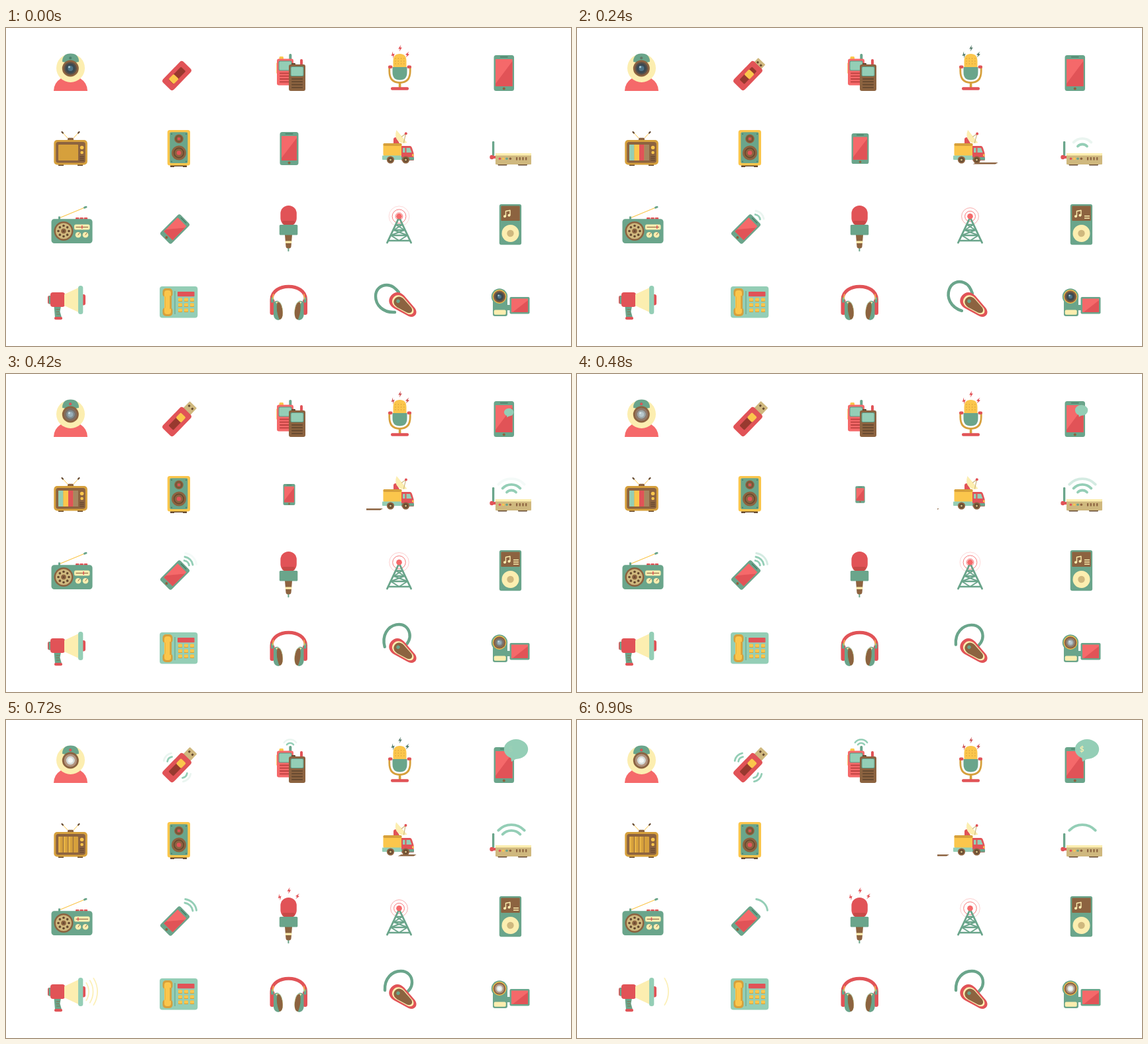
An HTML page that plays this animation: 853x480 px, repeating every 0.96 s.

```html
<!DOCTYPE html>
<html lang="en">
<head>
<meta charset="utf-8">
<title>Media icons</title>
<style>
html, body { margin: 0; width: 100%; height: 100%; overflow: hidden; background: #fff; }
svg { display: block; width: 853px; height: 480px; }
</style>
</head>
<body>
<svg id="stage" viewBox="0 0 853 480" xmlns="http://www.w3.org/2000/svg"></svg>
<script>
const RED = '#e15357', PINK = '#f5696a', GREEN = '#6aa58b', MINT = '#94ceb6',
  YELLOW = '#fbc64c', OCHRE = '#d6a03c', CREAM = '#fceeb0', TAN = '#cfb87e',
  BROWN = '#8c6340', DARK = '#64482f', MAROON = '#98392f';
const LOOP = 960, STEP = 60;

const rect = (x, y, w, h, fill, r = 0, more = '') =>
  `<rect x="${x}" y="${y}" width="${w}" height="${h}" rx="${r}" fill="${fill}" ${more}/>`;
const circ = (x, y, r, fill, more = '') =>
  `<circle cx="${x}" cy="${y}" r="${r}" fill="${fill}" ${more}/>`;
const path = (d, fill, more = '') => `<path d="${d}" fill="${fill}" ${more}/>`;
const line = (d, color, w, more = '') =>
  `<path d="${d}" fill="none" stroke="${color}" stroke-width="${w}" stroke-linecap="round" stroke-linejoin="round" ${more}/>`;
const group = (move, body, id = '') =>
  `<g ${id && `id="${id}"`} ${move && `transform="${move}"`}>${body}</g>`;
const list = (n, f) => Array.from({ length: n }, (_, i) => f(i)).join('');

function arc(x, y, r, from, to, color, w, id) {
  const at = a => {
    const k = a * Math.PI / 180;
    return (x + r * Math.cos(k)).toFixed(2) + ' ' + (y + r * Math.sin(k)).toFixed(2);
  };
  return line(`M${at(from)}A${r} ${r} 0 0 1 ${at(to)}`, color, w, `id="${id}"`);
}

// Upright phone centred on the origin
function phone(w, h) {
  const sw = w - 5, top = -h / 2 + 6, sh = h - 13;
  return rect(-w / 2, -h / 2, w, h, GREEN, 3.5) +
    rect(-sw / 2, top, sw, sh, PINK) +
    path(`M${sw / 2} ${top + 3}V${top + sh}H${-sw / 2}V${top + sh - 4}Z`, RED) +
    rect(-6, -h / 2 + 2, 12, 1.6, '#4b7f69', .8) +
    circ(0, h / 2 - 3.4, 2, BROWN);
}

function lens(x, y, r, id) {
  return circ(x, y, r, BROWN) + circ(x, y, r * .78, '#5c5148') +
    circ(x, y, r * .6, '#3a4a52') + circ(x, y, r * .32, '#4d7488') +
    circ(x - r * .15, y - r * .18, r * .13, '#a9cbd6') +
    group('', circ(x, y, r * .78, '#b3947f') + circ(x, y, r * .52, '#d5dbd9') +
      circ(x, y, r * .3, '#f4f7f5'), id);
}

const bolt = (x, y, turn) =>
  `<path d="M1.2-5L-2.8 1H-.2L-1.2 5L2.8-1H.2Z" transform="translate(${x} ${y}) rotate(${turn})"/>`;

function webcam() {
  return path('M72 95Q72 83 83 76Q97.500 70 112 76Q123 83 123 95Z', PINK) +
    circ(97.5, 60.5, 21.5, CREAM) +
    path('M85 51Q85 38.500 97.500 38.500T110 51Q97.500 54 85 51Z', GREEN) +
    circ(97.2, 45.3, 2, '#4b806b') + circ(97.2, 45.3, 2, RED, 'id="camDot"') +
    lens(97.3, 61, 12.5, 'camLight');
}

function usb() {
  return group('translate(258 72) rotate(-46)',
    group('', rect(6, -7.5, 15, 15, TAN, 1) + rect(14, -4.8, 3, 3, DARK) + rect(14, 1.8, 3, 3, DARK), 'plug') +
    rect(-22, -11.3, 44, 22.6, RED, 4) + rect(-13, -5, 27, 10, MAROON, 1.5) +
    rect(-5.5, -5.5, 11, 11, YELLOW, 2, 'id="slider"')) +
    arc(252, 64, 8.5, -170, -100, MINT, 2.8, 'usbA0') + arc(252, 64, 14, -170, -100, MINT, 2.8, 'usbB0') +
    arc(265, 79, 8.5, 10, 80, MINT, 2.8, 'usbA1') + arc(265, 79, 14, 10, 80, MINT, 2.8, 'usbB1');
}

function handset(x, y, body, key) {
  return rect(x, y, 25, 40, body, 3) + rect(x + 2.5, y + 3, 20, 15, '#5f9a85', 2) +
    rect(x + 3.5, y + 4, 18, 13, MINT, 1.5) +
    list(4, i => rect(x + 4, y + 21 + i * 4.3, 17, 1.8, key, .8));
}

function walkies() {
  return rect(427.3, 39, 4, 12, GREEN, 1.8) + rect(412.5, 43, 6.5, 7, YELLOW, 1.5) +
    rect(408.3, 52, 3, 17, YELLOW, 1.5) + handset(409, 46.5, PINK, '#bb403f') +
    rect(444, 47, 4, 12, RED, 1.8) + rect(431, 53, 6, 4, DARK, 1) +
    handset(427, 55, BROWN, DARK) +
    arc(429, 41, 6.3, -143, -37, MINT, 2.5, 'talk0') + arc(429, 41, 11.5, -143, -37, MINT, 2.5, 'talk1');
}

function studioMic() {
  return group('', bolt(595, 30.5, 0) + bolt(584.2, 40.5, -15) + bolt(606, 40, 15), 'bolts') +
    line('M578.800 59V65Q578.800 82.500 594.500 82.500T610.200 65V59', OCHRE, 2.8) +
    rect(592.8, 82, 3.6, 8, OCHRE) + rect(581, 89.3, 27, 4.4, RED, 2) +
    path('M583.500 59H605.500V67Q605.500 78.500 594.500 78.500T583.500 67Z', GREEN) +
    path('M584.500 59V50Q584.500 39 594.500 39T604.500 50V59Z', YELLOW) +
    list(12, i => circ(588 + i % 4 * 4.3, 46 + Math.floor(i / 4) * 4, .8, OCHRE)) +
    rect(577, 56.5, 6.5, 4.5, RED, 2) + rect(605.5, 56.5, 6.5, 4.5, RED, 2);
}

function chat() {
  return group('translate(751.8 68)', phone(30.5, 54)) +
    group('', `<ellipse cx="770" cy="44" rx="18.2" ry="15" fill="${MINT}"/>` +
      path('M762 54L763 63L773 57Z', MINT), 'bubble') +
    `<text id="cash" x="762.3" y="48.300" text-anchor="middle" font-family="Lato, sans-serif" font-weight="700" font-size="12" fill="${CREAM}">$</text>`;
}

function tv() {
  return line('M93 166L85.500 158M102 166L109.500 158', YELLOW, 1) +
    line('M86 158.500L84.500 157M109 158.500L110.500 157', DARK, 2.2) +
    rect(93, 165.8, 9, 5, BROWN, 1.5) + rect(79, 204, 8, 4, DARK) + rect(108, 204, 8, 4, DARK) +
    rect(72.3, 169, 50.5, 37.5, OCHRE, 5) + rect(75.3, 172, 44.5, 31.5, BROWN, 3.5) +
    rect(79, 176, 30, 24, OCHRE, 1) +
    group('', list(3, i => rect(85.8 + i * 7.5, 176, 1, 24, BROWN) + rect(79.5 + i * 7.5, 176, 2.5, 24, '#e8b446')), 'strips') +
    group('', [MINT, YELLOW, RED, '#a68660'].map((c, i) => rect(79 + i * 7.5, 176, 7.5, 24, c)).join(''), 'bars') +
    circ(114.6, 180.5, 2.8, YELLOW) + circ(114.6, 188, 2.3, YELLOW) +
    list(3, i => rect(111.3, 193.5 + i * 2.8, 6.6, 1.2, DARK));
}

function speaker() {
  const cone = (y, r, id) => group('', circ(0, 0, r, BROWN) + circ(0, 0, r * .72, DARK) +
    circ(0, 0, r * .58, BROWN) + circ(0, 0, r * .3, RED), id);
  return rect(248, 205, 6, 5, DARK) + rect(267, 205, 6, 5, DARK) +
    rect(250, 207, 21, 2, DARK) + rect(243.7, 154, 34.3, 53.5, YELLOW, 3.5) +
    rect(247.3, 157.3, 27, 46.7, GREEN, 2) +
    [[250, 160], [272, 160], [250, 201.5], [272, 201.5]].map(p => circ(...p, 1, '#477c66')).join('') +
    cone(167.3, 6.8, 'tweeter') + cone(188.5, 11, 'woofer');
}

function van() {
  const wheel = x => circ(x, 199, 5.6, BROWN) + circ(x, 199, 3.4, DARK) + circ(x, 199, 1.6, TAN);
  const dash = (w, id) => path(`M0 205.500L5 203H${w}L${w - 4} 205.500Z`, BROWN, `id="${id}"`);
  return `<clipPath id="road"><rect x="544" y="198" width="101" height="10"/></clipPath>` +
    `<g clip-path="url(#road)">${dash(38, 'dash0')}${dash(28, 'dash1')}</g>` +
    path('M585 174V168Q585 165 589 165L594 174Z', RED) +
    group('', path('M589.500 154Q585.500 165 592.500 171Q598 175.500 605.500 173Z', CREAM) +
      line('M597.500 164L603.500 159.500M603.500 159.500L600.500 173', TAN, 1.2) + circ(603.8, 159.3, 2, RED), 'dish') +
    rect(569.5, 174, 28, 19, YELLOW, 2) + rect(569.5, 174, 28, 4, OCHRE, 2) +
    path('M597 178H610Q612 178 613 181L615.500 189V200H597Z', RED) +
    path('M604.500 181H610L612.500 188H604.500Z', MINT) + rect(599, 181, 3.5, 7, MINT, .5) +
    rect(568, 192.5, 29, 6.5, MINT, 1) + rect(597, 195, 19, 4.5, GREEN, 1) + rect(613, 190.5, 2.5, 3, YELLOW) +
    wheel(580.5) + wheel(603.5);
}

function router() {
  const lamp = [RED, YELLOW, GREEN, BROWN];
  return rect(734, 171, 3.3, 22, GREEN, 1.2) + circ(733.5, 195, 3.2, RED) + rect(734, 193, 6, 4, RED) +
    rect(742.5, 204.5, 14, 3, DARK, 1) + rect(773, 204.5, 14, 3, DARK, 1) +
    rect(739, 189, 54, 17, TAN, 1) + rect(739, 189, 54, 3.5, CREAM, 1) +
    lamp.map((c, i) => circ(745.5 + i * 5.3, 197.3, 1.8, c)).join('') +
    list(4, i => rect(770 + i * 4.7, 195, 2.2, 4.5, BROWN, .5)) +
    list(3, i => arc(763, 185, 9.5 + i * 8.7, -137, -43, MINT, 3.8, 'wifi' + i));
}

function radio() {
  const knob = x => circ(x, 312.3, 4.3, CREAM) + line(`M${x} 312.300L${x + 2} 309.500`, BROWN, 1);
  return line('M80 287L120 270.500', YELLOW, 1.2) + line('M118.500 271.200L121 270.200', GREEN, 3) +
    rect(79, 284.5, 3, 5, GREEN) + list(3, i => rect(105 + i * 6.3, 286, 5.5, 4, RED, 1)) +
    rect(68.5, 288.3, 62, 36.7, GREEN, 4.5) + circ(87, 306.5, 14.5, BROWN) + circ(87, 306.5, 12, TAN) +
    list(8, i => circ(87 + 8 * Math.cos(i * Math.PI / 4), 306.5 + 8 * Math.sin(i * Math.PI / 4), 1.8, DARK)) +
    circ(87, 306.5, 3.8, BROWN) + circ(87, 306.5, 1.6, DARK) +
    rect(103, 296.5, 23.5, 8, CREAM, 2.5) + rect(105.5, 300, 18.5, 1.1, BROWN) +
    rect(0, 298, 1.5, 5, RED, 0, 'id="needle"') + knob(109) + knob(120);
}

function caller() {
  return group('translate(255 303.500) rotate(45)', phone(23.7, 42.5)) +
    list(3, i => arc(268, 290, 8.5 + i * 5.6, -82, -8, MINT, 2.9, 'call' + i));
}

function reporterMic() {
  return group('', bolt(427.3, 257.5, 0) + bolt(413.2, 267.3, -20) + bolt(440, 266, 20), 'sparks') +
    rect(425.4, 329, 2, 8.3, GREEN, .9) + path('M421 312H432L430.500 330Q430 332.500 428 332.500H425Q423 332.500 422.500 330Z', BROWN) +
    rect(421.7, 321.5, 9.6, 3.3, CREAM) +
    rect(414.4, 268, 24.4, 31, RED, 12) + rect(417, 291, 19, 6, MAROON, 2, 'opacity=".35"') +
    rect(412.8, 297, 27.5, 15.5, GREEN, 1.5);
}

function tower() {
  return list(3, i => circ(593.5, 284.3, 8, 'none', `id="ring${i}" stroke="${PINK}" stroke-width="1"`)) +
    line('M592.500 288L575.500 324M594.500 288L611.500 324', GREEN, 2.9) +
    line('M589 297H598M585.500 305H601.500M581 313H606M577 321H610', GREEN, 2.4) +
    line('M589 297L601.500 305L581 313M598 297L585.500 305L606 313M581 313L593.500 321L606 313', GREEN, 2) +
    circ(593.5, 284.3, 4.3, PINK);
}

function player() {
  return rect(744.8, 266, 33.3, 61.3, GREEN, 3) + rect(747.3, 268.5, 28.5, 22.5, BROWN, 1) +
    line('M754.500 284V276.500L761 275.200V282.500', CREAM, 1.4) +
    circ(753, 284.3, 2, CREAM) + circ(759.5, 282.8, 2, CREAM) +
    list(4, i => rect(766, 286.3 - i * 3.2, 8, 1.5, CREAM, 0, `id="row${i}"`)) +
    circ(761.5, 310, 13, CREAM) + circ(761.5, 310, 5.2, TAN);
}

function megaphone() {
  return path('M72.500 420H83L81.500 428L84 437H74Z', GREEN) +
    line('M76 425H80.500M76 428.500H80.500M76.500 432H81', BROWN, .8) + rect(73, 436, 12, 4.3, RED, 2) +
    rect(113, 402, 7, 16.5, RED, 3) + rect(63, 404, 6, 12.5, RED, 2.5) + rect(64.5, 404, 3, 12.5, GREEN, 1) +
    rect(67, 399, 22, 22, RED, 4) + path('M88 402L109.500 392V429L88 419Z', CREAM) +
    rect(109, 389, 7.3, 43, MINT, 3.5) +
    list(3, i => arc(100, 410, 25 + i * 6.5, -32, 32, CREAM, 1.8, 'shout' + i));
}

function deskPhone() {
  return rect(232, 390, 57.3, 47.5, MINT, 4) + rect(239, 398, 10, 32, '#73b096', 2) +
    rect(240, 400, 8, 28, OCHRE) + rect(236.5, 393, 15, 13.5, OCHRE, 5) + rect(236.5, 421.5, 15, 13.5, OCHRE, 5) +
    rect(239, 396, 10, 36, YELLOW, 4) + rect(240.5, 404, 9.5, 20, OCHRE, 2) + rect(241, 404, 6.3, 20, YELLOW) +
    rect(254.4, 397, 1.2, 35, GREEN) + rect(259, 398, 25.5, 7.2, RED, 1) +
    list(9, i => rect(260 + i % 3 * 9, 407.8 + Math.floor(i / 3) * 8, 6, 5.3, OCHRE, 1.2) +
      rect(260 + i % 3 * 9, 407.5 + Math.floor(i / 3) * 8, 6, 4.4, YELLOW, 1.2));
}

function headphones() {
  const cup = rect(398.5, 409, 7, 24, RED, 3.2) + rect(400, 406.5, 4, 8, GREEN, 1) +
    path('M404 415Q406 411 411 412Q418 416 418 430Q418 440 411 441Q405 440 404 434Z', GREEN) +
    path('M407 414Q411 411.500 414 415Q418 421 418 430Q418 439 413 440Q414 420 407 414Z', CREAM) +
    path('M409.500 414Q413.500 413 415.700 419Q418.500 427 417.500 434Q416.500 440 412.500 440Q407 426 409.500 414Z', BROWN) +
    line('M403.700 402L402.500 409', YELLOW, 1.4);
  return line('M401 410C401 383.500 452.500 383.500 452.500 410', RED, 5, 'stroke-linecap="butt"') +
    cup + group('translate(853.500 0) scale(-1 1)', cup);
}

function earpiece() {
  const pod = (k, fill) => path('M-23 0C-23-9-16-13-8-12L16-7.500C25-5 25 5 16 7.500L-8 12C-16 13-23 9-23 0Z',
    fill, `transform="scale(${k})"`);
  return line('M572 408C571 390 583 379 596 379C607 379 613 387 613 396C613 404 608 409 602 414', GREEN, 4.4, 'id="hook"') +
    group('translate(599.800 418.700) rotate(39)', pod(1.03, RED) +
      group('scale(1 .95)', pod(.82, CREAM) + pod(.7, BROWN)) + circ(-10, 0, 2.7, GREEN));
}

function camcorder() {
  return rect(735, 405, 22, 30, GREEN, 3) + rect(756, 418, 6, 8, GREEN) + circ(745, 405.5, 12.2, GREEN) +
    circ(745, 405.5, 10.4, YELLOW) + lens(745, 405.5, 9.3, 'recLight') + rect(736.7, 425.5, 18, 7.2, CREAM, 2) +
    rect(760.5, 406, 30, 25.5, GREEN, 2) + rect(763, 408.5, 25, 20.5, PINK) + path('M788 411V429H765Z', RED);
}

const stage = document.getElementById('stage');
stage.innerHTML = [webcam, usb, walkies, studioMic, chat, tv, speaker,
  () => group('', phone(28, 50), 'shrink'), van, router, radio, caller, reporterMic,
  tower, player, megaphone, deskPhone, headphones, earpiece, camcorder].map(f => f()).join('');

const parts = {};
stage.querySelectorAll('[id]').forEach(e => parts[e.id] = e);
const set = (id, name, v) => parts[id].setAttribute(name, v);
const fade = (id, v) => set(id, 'opacity', v.toFixed(3));
const move = (id, v) => set(id, 'transform', v);
const ramp = (t, a, b) => Math.min(1, Math.max(0, (t - a) / (b - a)));
const blend = (a, b, k) => 'rgb(' + a.map((v, i) => Math.round(v + (b[i] - v) * k)) + ')';
set('sparks', 'fill', RED);

function draw(t) {
  const glow = ramp(t, 270, 600);
  fade('camLight', glow);
  fade('recLight', glow);
  fade('camDot', ramp(t, 200, 420));

  const out = Math.sin(ramp(t, 60, 480) * Math.PI / 2);
  move('plug', `translate(${15 * out} 0)`);
  move('slider', `translate(${-7 + 16 * out} 0)`);
  for (const i of [0, 1]) {
    fade('usbA' + i, ramp(t, 480, 600));
    fade('usbB' + i, ramp(t, 690, 840));
  }
  fade('talk0', ramp(t, 480, 600));
  fade('talk1', ramp(t, 690, 840));

  const swing = (1 - Math.cos(t * Math.PI / 240)) / 2;
  set('bolts', 'fill', blend([225, 75, 80], [84, 122, 106], swing));
  fade('sparks', ramp(t, 510, 600));

  const pop = ramp(t, 240, 690);
  move('bubble', `translate(752 67) scale(${pop}) translate(-752 -67)`);
  fade('cash', ramp(t, 710, 880));

  fade('bars', ramp(t, 0, 110) * (1 - ramp(t, 600, 720)));
  fade('strips', ramp(t, 540, 660));

  const beat = 1 - .1 * Math.max(0, Math.sin(t * Math.PI / 240));
  move('tweeter', `translate(261 167.300) scale(${beat})`);
  move('woofer', `translate(261 188.500) scale(${beat})`);
  move('shrink', `translate(427.500 182) scale(${1 - ramp(t, 120, 670) ** 1.7})`);

  move('dash0', `translate(${642 - .37 * (t - 120)} 0)`);
  move('dash1', `translate(${630 - .32 * (t - 600)} 0)`);
  move('dish', `rotate(${2 * Math.sin(t * Math.PI / 480)} 595 170)`);

  const wave = [ramp(t, 40, 180) * (1 - ramp(t, 540, 680)),
    ramp(t, 200, 400) * (1 - ramp(t, 750, 880)), ramp(t, 400, 600)];
  wave.forEach((v, i) => {
    fade('wifi' + i, v);
    fade('call' + i, v);
  });

  set('needle', 'x', 114 + 6 * Math.sin(t * Math.PI / 480));

  for (let i = 0; i < 3; i++) {
    const r = 5.4 + t / 96 % 5 + 5 * i;
    set('ring' + i, 'r', r);
    fade('ring' + i, .9 * (1 - ramp(r, 10, 17.5)));
    fade('shout' + i, ramp(t, 640, 720) * (i < 2 ? 1 - ramp(t, 740, 880) : 1) * .9);
  }

  const rows = Math.min(Math.round(t / 150), Math.max(0, (840 - t) / 60));
  for (let i = 0; i < 4; i++) fade('row' + i, i < rows ? 1 : 0);

  const k = ramp(t, 120, 510);
  move('hook', `rotate(${-90 * (1 - k * k * (3 - 2 * k))} 590 411)`);
}

const start = performance.now();
function tick() {
  const t = (performance.now() - start) % LOOP;
  draw(Math.floor(t / STEP) * STEP);
  requestAnimationFrame(tick);
}
draw(0);
requestAnimationFrame(tick);
</script>
</body>
</html>
```
